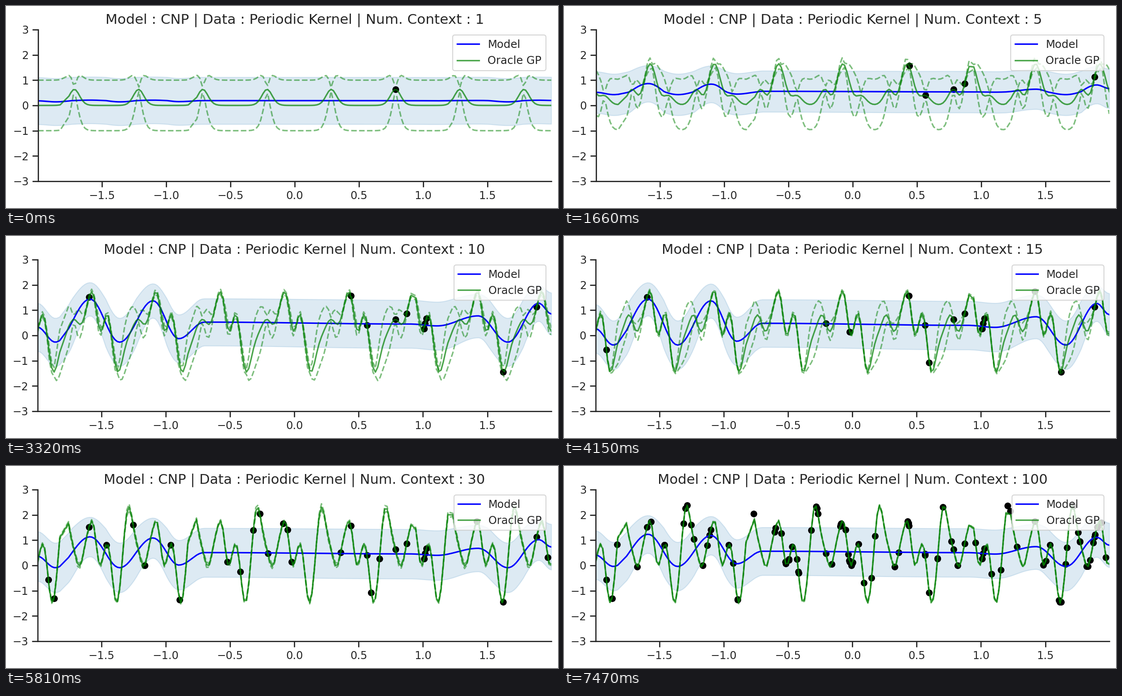
A matplotlib script that plays this animation: 1237 by 453 pixels, repeating every 8300 ms.

```python
import matplotlib.pyplot as plt
import numpy as np
from matplotlib.animation import FuncAnimation

WIDTH, HEIGHT, DPI = 1237, 453, 72  # at 72 dpi one point is one pixel
INK = "0.15"
PERIOD, LENGTH, NOISE = 0.5, 0.5, 0.005
X_MIN, X_MAX = -1.997, 1.998
COUNTS = [1, 3, 5, 7, 10, 15, 20, 30, 50, 100]

plt.rcParams.update({
    "font.family": "DejaVu Sans",
    "text.color": INK,
    "axes.edgecolor": INK,
})

# Hidden periodic function: (phase, value) at its bends
BENDS = np.array([
    (0, .1), (.036, .82), (.066, .4), (.086, -.56), (.118, -1.48),
    (.162, .27), (.211, 2.38), (.245, 1.6), (.285, .64), (.336, 0),
    (.373, .87), (.418, 1.74), (.445, 1.41), (.477, .14),
])

# First context locations in order of arrival; the rest are random
FIRST_X = [
    .785, .566, 1.884, .44, .873, -1.597, 1.017, 1.008, 1.026, 1.623,
    -1.914, -.207, -.023, .597, 1.418, -1.87, -1.464, -1.255, -1.164, -.964,
    -.894, -.523, -.42, -.32, -.269, -.089, -.055, .36, .662, 1.971,
]

# Stretches without any sampled location
GAPS = [(-1.825, -1.757), (-.828, -.762), (.907, .943), (1.194, 1.232)]

# Turning points of the model's wave around its level
WAVE = np.array([
    (-2, -.15), (-1.86, -.8), (-1.59, 1.02), (-1.36, -.8), (-1.1, .95),
    (-.9, -.65), (-.7, .06), (.9, -.02), (1.11, -.1), (1.43, .32),
    (1.66, -.8), (1.9, .85), (2, .4),
])

# Context count: level, peak gain, dip gain, half width of the band
FITS = {
    1: (.19, .02, .06, .93),
    5: (.54, .32, .14, .82),
    7: (.63, .45, .32, .84),
    10: (.47, .95, .92, .95),
    15: (.42, 1, 1, .96),
    30: (.47, .65, .7, .98),
    100: (.52, .7, .7, .96),
}


def kernel(a, b):
    phase = np.pi * np.subtract.outer(a, b) / PERIOD
    return np.exp(-2 * np.sin(phase) ** 2 / LENGTH ** 2)


def posterior(x, y, targets, noise):
    """Mean and deviation of a periodic Gaussian process."""
    gram = kernel(x, x) + noise * np.eye(len(x))
    cross = kernel(targets, x)
    weights = np.linalg.solve(gram, cross.T)
    variance = 1 - np.sum(cross * weights.T, axis=1)
    return weights.T @ y, np.sqrt(np.maximum(variance, 0))


def eased(x, points):
    """Join points with a cosine ease from each to the next."""
    position = np.interp(x, points[:, 0], np.arange(len(points)))
    step = np.floor(position)
    ease = (1 - np.cos(np.pi * (position - step))) / 2
    return np.interp(step + ease, np.arange(len(points)), points[:, 1])


def model_curve(index):
    known = [COUNTS.index(count) for count in FITS]
    level, peak, dip, spread = (np.interp(index, known, column)
                                for column in zip(*FITS.values()))
    wave = eased(grid, WAVE)
    rise = peak * np.maximum(wave, 0)
    return level + rise + dip * np.minimum(wave, 0), spread - 0.3 * rise


grid = np.linspace(X_MIN, X_MAX, 220)
for low, high in GAPS:
    grid = grid[(grid <= low) | (grid >= high)]
    grid = np.union1d(grid, [low, high])

rng = np.random.default_rng(4)
context_x = np.concatenate(
    [FIRST_X, rng.uniform(X_MIN, X_MAX, COUNTS[-1] - len(FIRST_X))])
context_y = posterior(*BENDS.T, context_x, 1e-5)[0]

fig = plt.figure(figsize=(WIDTH / DPI, HEIGHT / DPI), dpi=DPI,
                 facecolor="white")
ax = fig.add_axes([0, 0, 1, 1])


def style_axes(count, unit, left):
    ax.set_position([left / WIDTH, 60 / HEIGHT,
                     (1222 - left) / WIDTH, 340 / HEIGHT])
    ax.set(xlim=(X_MIN, X_MAX), ylim=(-3, 3),
           xticks=np.arange(-1.5, 1.6, 0.5), yticks=range(-3, 4))
    ax.tick_params(length=6 * unit, width=1.25 * unit, pad=3.5 * unit,
                   labelsize=11 * unit, color=INK, labelcolor=INK)
    for side, spine in ax.spines.items():
        spine.set_visible(side in ("left", "bottom"))
        spine.set_linewidth(1.25 * unit)
    ax.set_title("Model : CNP | Data : Periodic Kernel | "
                 f"Num. Context : {count}", fontsize=14 * unit, pad=6 * unit)
    legend = ax.legend(loc="upper right", fontsize=11 * unit,
                       framealpha=0.8, edgecolor="0.8")
    legend.get_frame().set_linewidth(unit)


def draw(index):
    count = COUNTS[index]
    unit, left = (2.22, 72) if count < 10 else (2.19, 71)
    width = 1.5 * unit
    ax.clear()

    center, half = model_curve(index)
    ax.fill_between(grid, center - half, center + half, color="tab:blue",
                    alpha=0.15, linewidth=unit)
    ax.plot(grid, center, color="blue", lw=width, label="Model")

    x, y = context_x[:count], context_y[:count]
    oracle, deviation = posterior(x, y, grid, NOISE)
    ax.plot(grid, oracle, color="green", alpha=0.7, lw=width,
            label="Oracle GP")
    for bound in (oracle + deviation, oracle - deviation):
        ax.plot(grid, bound, "--", color="green", alpha=0.5, lw=width)
    ax.scatter(x, y, s=15 ** 2, color="black", linewidths=0)

    style_axes(count, unit, left)
    return []


animation = FuncAnimation(fig, draw, frames=len(COUNTS), interval=830,
                          repeat=True, repeat_delay=0)
plt.show()
```
